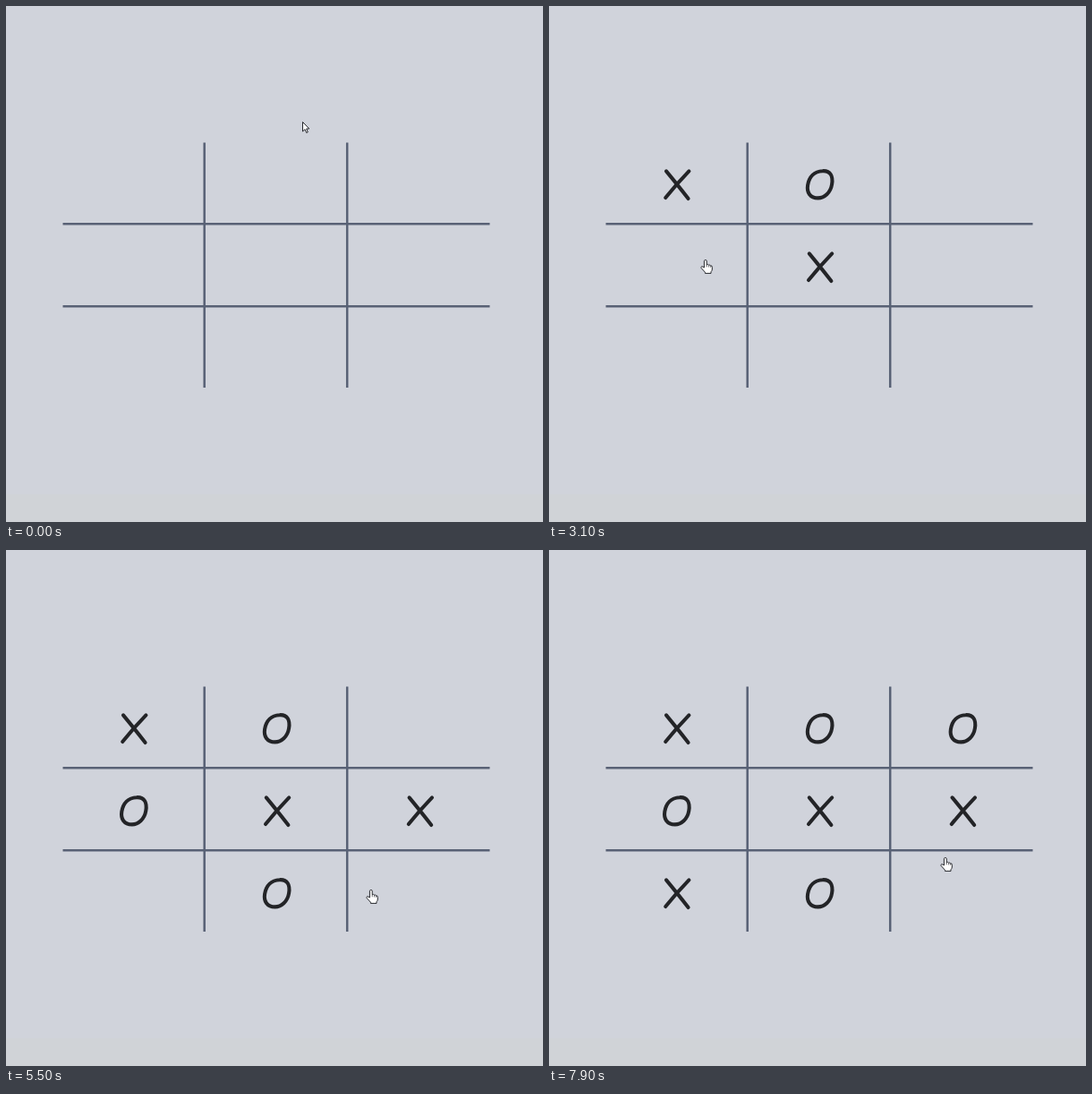
An HTML page that plays this animation: 600x576 px, repeating every 8 s.

```html
<!DOCTYPE html>
<html lang="en">
<head>
<meta charset="utf-8">
<title>Noughts and crosses</title>
<style>
html, body { margin: 0; width: 100%; height: 100%; overflow: hidden; background: #d0d3db; }
svg { display: block; width: 600px; height: 576px; }
.grid { stroke: #586175; stroke-width: 2.5; }
.mark { fill: none; stroke: #232427; stroke-width: 4.1; stroke-linecap: round; stroke-linejoin: round; }
.pointer { fill: #fff; stroke: #24262b; stroke-width: 1; stroke-linejoin: round; }
</style>
</head>
<body>
<svg viewBox="0 0 600 576">
  <rect width="600" height="576" fill="#d0d3db"/>
  <rect y="545" width="600" height="31" fill="#d0d3d7"/>
  <path class="grid" d="M221.7 152.5V426M381.2 152.5V426M63.5 243.2H540.5M63.5 335.2H540.5"/>
  <g id="marks"></g>
  <path id="arrow" class="pointer" d="M.5 .5V11L3 8.7 4.7 12.5 6.3 11.8 4.7 8H7.8Z"/>
  <g id="hand" class="pointer">
    <path d="M-1.6 9V1.7Q-1.6 .5 -.2 .5T1.2 1.7V5.7Q2.5 4.8 3.6 6.2 4.8 5.6 5.7 6.9 7.3 6.6 7.3 8.4V11Q7.2 12.6 6 13.7V15.4H-.6V14.2L-4.9 9.5Q-5.5 8.2 -4.3 7.8 -3.2 7.6 -1.6 9Z"/>
    <path d="M1.2 5.7V8.3M3.6 6.2V8.5M5.7 6.9V8.8" stroke-width=".7"/>
  </g>
</svg>
<script>
const LOOP = 8000, STEP = 100;
const get = id => document.getElementById(id);
const arrow = get('arrow'), hand = get('hand');

const shapes = {
  X: 'M3.2 3.4Q14.5 17 27.8 34M28.6 3.4Q15 17.5 2.4 33',
  O: 'M18 3.2C27 2.6 30 9 28.5 18 27 27.5 20 33.4 13 33.4 4 33.4 .2 27 1.5 19 3 9.5 9 3.6 18 3.2Z'
};

// [shape, column, row, time shown]
const moves = [
  ['X', 0, 0, 1600], ['O', 1, 0, 2000],
  ['X', 1, 1, 3100], ['O', 0, 1, 3500],
  ['X', 2, 1, 4700], ['O', 1, 2, 5400],
  ['X', 0, 2, 6800], ['O', 2, 0, 7600]
];

// pointer tip: [time, x, y]
const path = [
  [0, 331, 129], [900, 181, 174], [1000, 181, 174], [1200, 180, 178],
  [1500, 180, 178], [1800, 276, 178], [1900, 276, 178], [2200, 206, 258],
  [2400, 188, 275], [2600, 188, 275], [2900, 177, 284], [3200, 174, 282],
  [3400, 174, 282], [3900, 373, 321], [4300, 444, 360], [4500, 443, 358],
  [4700, 443, 358], [5200, 323, 380], [5300, 323, 380], [5500, 408, 379],
  [5700, 421, 376], [5900, 421, 376], [6100, 422, 378], [6600, 422, 378],
  [6700, 365, 346], [7000, 352, 300], [7500, 448, 210], [7550, 448, 210],
  [7900, 443, 343], [8000, 443, 343]
];

const marks = moves.map(([shape, col, row, at]) => {
  const el = document.createElementNS('http://www.w3.org/2000/svg', 'path');
  el.setAttribute('class', 'mark');
  el.setAttribute('d', shapes[shape]);
  el.setAttribute('transform', `translate(${127.8 + col * 159.8} ${181 + row * 92})`);
  get('marks').append(el);
  return { el, at };
});

function pointerAt(t) {
  const i = path.findIndex(p => p[0] > t);
  const [t0, x0, y0] = path[i - 1], [t1, x1, y1] = path[i];
  let k = (t - t0) / (t1 - t0);
  if (i === 1) k = k * k * (3 - 2 * k);
  return [x0 + (x1 - x0) * k, y0 + (y1 - y0) * k];
}

const show = (el, on) => el.setAttribute('visibility', on ? 'visible' : 'hidden');

function draw(now) {
  const t = Math.floor(now % LOOP / STEP) * STEP;
  const [x, y] = pointerAt(t).map(Math.round);
  const overBoard = y >= 152;
  for (const m of marks) show(m.el, t >= m.at);
  show(arrow, !overBoard);
  show(hand, overBoard);
  for (const el of [arrow, hand]) el.setAttribute('transform', `translate(${x} ${y})`);
}

function tick() {
  draw(performance.now());
  requestAnimationFrame(tick);
}
tick();
</script>
</body>
</html>
```
